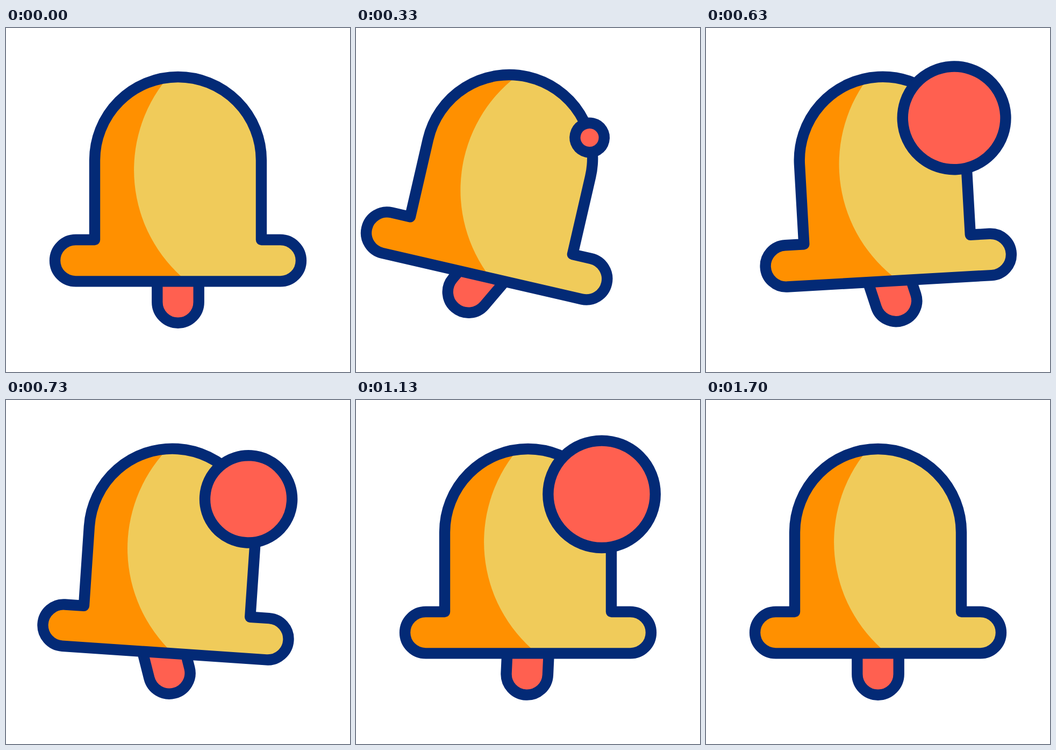
Animation of 640x640 px, one loop 2 s. Source, as an HTML page:

```html
<!DOCTYPE html>
<html lang="en">
<head>
<meta charset="utf-8">
<title>Notification bell</title>
<style>
  html, body { margin: 0; width: 100%; height: 100%; overflow: hidden; background: #fff; }
  svg { display: block; width: 100vw; height: 100vh; }
  .line { stroke: #032a76; stroke-width: 20.4; stroke-linejoin: round; stroke-linecap: round; }
  .red { fill: #ff6050; }
</style>
</head>
<body>
<svg viewBox="0 0 640 640">
  <defs>
    <path id="shape" d="M165 394 V246 A155 155 0 0 1 475 246 V394 H510.3 A38.7 38.7 0 0 1 510.3 471.4 H129.7 A38.7 38.7 0 0 1 129.7 394 Z"/>
    <clipPath id="inside"><use href="#shape"/></clipPath>
  </defs>
  <g id="bell">
    <path id="clapper" class="line red" d="M281.3 440 V510 A38.7 38.7 0 0 0 358.7 510 V440 Z"/>
    <use href="#shape" fill="#ff9000"/>
    <g clip-path="url(#inside)"><circle cx="505.1" cy="264.2" r="267" fill="#f0cb5a"/></g>
    <use href="#shape" class="line" fill="none"/>
    <circle id="badge" class="line red" cx="457.1" cy="175.3" r="0"/>
  </g>
</svg>
<script>
  const LOOP = 2000, FPS = 30, BADGE = 97.7;

  const clamp = u => Math.min(1, Math.max(0, u));
  const smooth = u => u * u * (3 - 2 * u);
  const ease = (frame, start, end) => smooth(clamp((frame - start) / (end - start)));

  // Each move eases from the previous goal to the next: [goal, start, end].
  const follow = (frame, moves) => moves.reduce(
    (value, [goal, start, end]) => value + (goal - value) * ease(frame, start, end), 0);

  // The bell's swings get smaller and quicker until it hangs straight.
  function bellAngle(frame) {
    let angle = 0, start = 0;
    for (let i = 0; i < 5; i++) {
      const goal = i < 4 ? 13 * (-0.545) ** i : 0;
      const end = start + Math.round(10 * 0.72 ** i);
      angle += (goal - angle) * ease(frame, start, end);
      start = end;
    }
    return angle;
  }

  // The clapper trails behind the bell and settles later.
  const clapperAngle = frame => follow(frame, [
    [28, 0, 11], [-20, 11, 21], [14.5, 21, 28], [-3.8, 28, 38], [0, 38, 50]
  ]);

  // The badge pops out too far, springs back, rests and shrinks away.
  const badgeRadius = frame => follow(frame, [
    [BADGE * 1.14, 7.2, 15.9], [BADGE * 0.83, 15.9, 22],
    [BADGE * 1.023, 22, 32], [BADGE, 32, 42], [0, 45, 51]
  ]);

  const [bell, clapper, badge] = ['bell', 'clapper', 'badge'].map(id => document.getElementById(id));
  const rotate = (el, angle, x, y) => el.setAttribute('transform', `rotate(${angle} ${x} ${y})`);

  function draw(ms) {
    // The small offset matches frame delays rounded to 10 ms.
    const frame = Math.floor((ms % LOOP) * FPS / 1000 + 0.11);
    const r = badgeRadius(frame);
    rotate(bell, bellAngle(frame), 320, 91);
    rotate(clapper, clapperAngle(frame), 320, 471.4);
    badge.setAttribute('r', r);
    badge.setAttribute('visibility', r > 0 ? 'visible' : 'hidden');
  }

  const begin = performance.now();
  function tick() {
    draw(performance.now() - begin);
    requestAnimationFrame(tick);
  }
  tick();
</script>
</body>
</html>
```
